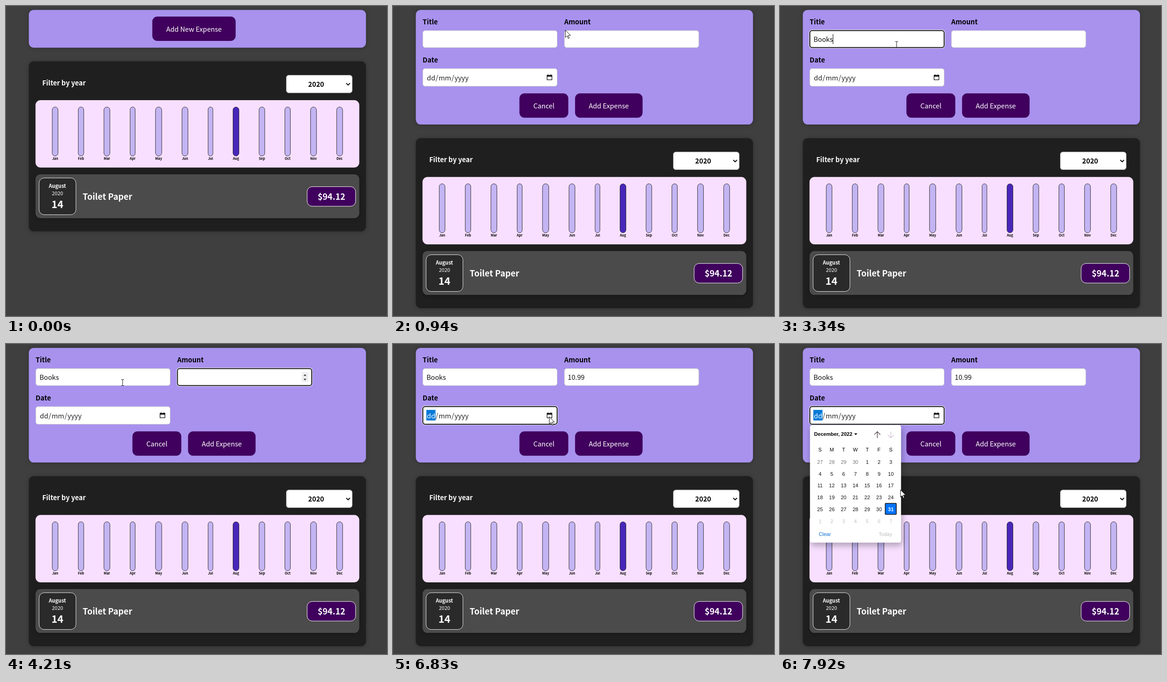
An HTML page that plays this animation: 830 by 675 pixels, repeating every 7990 ms.

```html
<!DOCTYPE html>
<html lang="en">
<head>
<meta charset="utf-8">
<title>Expense tracker</title>
<style>
  html, body { margin: 0; width: 100%; height: 100%; overflow: hidden; background: #3f3f3f; }
  svg { display: block; width: 830px; height: 675px; }
  text { font-family: "Noto Sans CJK JP", "Noto Sans CJK SC", "Noto Sans CJK", "Noto Sans", sans-serif; font-size: 14.69px; white-space: pre; }
  .b { font-weight: 700; }
  .cal text { font-family: "Liberation Sans", Arial, sans-serif; font-size: 11.02px; }
  .panel { filter: drop-shadow(0 1px 4px rgba(0,0,0,.25)); }
  .pop { filter: drop-shadow(2px 6px 7px rgba(0,0,0,.3)); }
</style>
</head>
<body>
<svg id="stage" viewBox="0 0 830 675"></svg>
<script>
const LOOP = 7990, STEP = 68;
const OPEN = 940, TITLE = 1410, AMOUNT = 3680, DATE = 6760, POPUP = 6900;

const rect = (x, y, w, h, r, fill, more = '') =>
  `<rect x="${x}" y="${y}" width="${w}" height="${h}" rx="${r}" fill="${fill}" ${more}/>`;
const text = (x, y, str, more = '') => `<text x="${x}" y="${y}" ${more}>${str}</text>`;
const mid = 'text-anchor="middle"';
const bold = 'class="b"';
const white = 'fill="#fff"';
const group = (id, body, more = '') => `<g id="${id}" ${more}>${body}</g>`;
const path = (d, more) => `<path d="${d}" ${more}/>`;

// Buttons: id, x, y, width, label
const buttons = {
  add: [318.7, 23, 181.6, 'Add New Expense'],
  cancel: [275.4, 190.2, 106.5, 'Cancel'],
  submit: [396.6, 190.2, 147.1, 'Add Expense']
};
const BUTTON_H = 53;
const button = id => {
  const [x, y, w, label] = buttons[id];
  return rect(x, y, w, BUTTON_H, 11, '#40005d', `id="${id}"`) +
    text(x + w / 2, y + 33, label, `${mid} ${white}`);
};

// Fields: x, y, height
const fields = { title: [64.5, 53, 38], amount: [373, 53, 38], date: [64.5, 135.7, 39.5] };
const FIELD_W = 293.6;
const field = id => {
  const [x, y, h] = fields[id];
  return rect(x + .5, y + .5, FIELD_W - 1, h - 1, 5, '#fff', 'stroke="#ccc"');
};
const ring = id => {
  const [x, y, h] = fields[id];
  return group(id + 'Ring',
    rect(x - 1.4, y - 1.4, FIELD_W + 2.8, h + 2.8, 6.8, '#fff') +
    rect(x + .5, y + .5, FIELD_W - 1, h - 1, 5, '#fff', 'stroke="#101010" stroke-width="2"'));
};

function formMarkup() {
  const spinner = group('spinner',
    rect(644, 61, 15, 22, 0, '#f0f0f0') +
    path('M648 69.5h6.6l-3.3-4zM648 75.5h6.6l-3.3 4z', 'fill="#4a4a4a"'));
  const icon =
    path('M335.6 151.2h10.6v9.4h-10.6z', 'fill="none" stroke="#111" stroke-width="1.3"') +
    path('M335 150.6h11.8v3.2h-11.8zM337 149h1.4v2h-1.4zM343.4 149h1.4v2h-1.4z', 'fill="#111"');
  return text(64.6, 40, 'Title', bold) + text(373, 40, 'Amount', bold) +
    text(64.6, 123, 'Date', bold) +
    field('title') + field('amount') + field('date') +
    ring('title') + ring('amount') + ring('date') + spinner +
    text(72.9, 78, '', 'id="titleText" fill="#111"') +
    text(380.8, 78, '', 'id="amountText" fill="#111"') +
    rect(0, 61, 1, 22, 0, '#000', 'id="caret"') +
    rect(72.6, 143.5, 20, 23, 0, '#0078d7', 'id="pick"') +
    text(73.8, 161.5, 'dd', 'id="day"') +
    [[92.8, '/'], [99.5, 'mm'], [127.5, '/'], [134, 'yyyy']]
      .map(([x, s]) => text(x, 161.5, s, 'fill="#222"')).join('') +
    icon + button('cancel') + button('submit');
}

function chartMarkup() {
  const months = 'Jan Feb Mar Apr May Jun Jul Aug Sep Oct Nov Dec'.split(' ');
  const centers = [107, 163.4, 219.8, 275.9, 332.5, 389.9, 445.5, 501, 557.5, 613.5, 669.9, 726.8];
  const widths = [13.5, 13, 14, 12, 14.5, 14, 11.5, 14, 13.5, 13, 14, 14];
  return rect(64.3, 205, 705.3, 146.7, 11, '#f8dfff') + months.map((m, i) => {
    const w = widths[i] - 1;
    return rect(centers[i] - w / 2, 219.9, w, 106.7, w / 2, m === 'Aug' ? '#4826b9' : '#c3b4f3', 'stroke="#313131"') +
      text(centers[i], 335, m, `${bold} ${mid} style="font-size:7.34px"`);
  }).join('');
}

function listMarkup() {
  const size = px => `style="font-size:${px}px"`;
  return rect(49.7, 120.6, 734.5, 370.2, 11, '#1f1f1f', 'class="panel"') +
    text(79, 172.5, 'Filter by year', `${bold} ${white}`) +
    rect(610.5, 150.5, 143.8, 38.8, 5.5, '#fff', 'stroke="#858585"') +
    text(658.3, 176, '2020', bold) +
    path('M741.2 168l4.1 4.1 4.1-4.1', 'fill="none" stroke="#111" stroke-width="2"') +
    chartMarkup() +
    rect(64.3, 366.4, 705.3, 95.5, 11, '#4b4b4b', 'class="panel"') +
    rect(72.1, 374.4, 80.2, 80, 11, '#2a2a2a', 'stroke="#ececec"') +
    text(112, 396, 'August', `${bold} ${mid} ${white} ${size(11.02)}`) +
    text(112.2, 412, '2020', `${mid} ${white} ${size(11.02)}`) +
    text(112, 440, '14', `${bold} ${mid} ${white} ${size(22.03)}`) +
    text(167, 422.3, 'Toilet Paper', `${bold} ${white} ${size(18.36)}`) +
    rect(656, 393.4, 105.6, 42.6, 11, '#40005d', 'stroke="#fff"') +
    text(709, 422.3, '$94.12', `${bold} ${mid} ${white} ${size(18.36)}`);
}

function calendarMarkup() {
  const colX = c => 87.2 + c * 25.7;
  let out = rect(65.3, 176.7, 198.4, 255.8, 4.5, '#fff', 'class="pop"') +
    text(74.3, 200, 'December, 2022', bold) +
    path('M161.5 194.5h7l-3.5 4z', 'fill="#111"') +
    path('M212 205v-14M205.5 197.3l6.5-6.5 6.5 6.5', 'fill="none" stroke="#3a2a36" stroke-width="1.2"') +
    path('M241.5 190.5v14M235 198l6.5 6.5 6.5-6.5', 'fill="none" stroke="#cdbdd0" stroke-width="1.2"') +
    rect(229.3, 347, 24, 24, 1, '#0075ff', 'stroke="#101010" stroke-width="1.6"');
  [...'SMTWTFS'].forEach((d, c) => out += text(colX(c), 234, d, mid));
  for (let i = 0; i < 42; i++) {
    const n = i - 3;
    const day = n < 1 ? n + 30 : n > 31 ? n - 31 : n;
    const fill = n < 1 ? '#757575' : n > 31 ? '#c3bec6' : n === 31 ? '#fff' : '#101010';
    out += text(colX(i % 7), 261 + Math.floor(i / 7) * 25.7, day,
      `${mid} fill="${fill}" ${n === 31 ? bold : ''}`);
  }
  return out + text(84.6, 418, 'Clear', 'fill="#0a6ed1"') + text(215, 418, 'Today', 'fill="#bdbdbd"');
}

const ink = 'fill="#fff" stroke="#111" stroke-linejoin="round"';
const cursors =
  group('arrow', path('M.5.5v16l3.7-3.6 2.5 5.8 2.4-1-2.5-5.7h5.1z', ink)) +
  group('hand', path('M-1 1.2c0-2 3.2-2 3.2 0v5.6c.6-1 2.6-.9 2.9.5.8-.9 2.4-.6 2.7.7.9-.6 2.4 0 2.4 1.6v4.2c0 2-1.4 3-1.4 5.7H.8c0-2-3.4-5.4-4.6-8-.7-1.6 1.4-2.3 2.8-.4z', ink.replace('#111', '#333')) +
    path('M2.2 7v4M5.1 7.5v3.8M7.8 8.2v3.4', 'stroke="#555" stroke-width=".8"')) +
  group('beam', path('M-3-6.5h2.5l.5.5.5-.5H3M0-6v12M-3 6.5h2.5l.5-.5.5.5H3', 'fill="none" stroke="#111"'));

document.getElementById('stage').innerHTML =
  rect(0, 0, 830, 675, 0, '#3f3f3f') +
  rect(49.7, 8.4, 734.5, 82.4, 11, '#a892ee', 'id="top" class="panel"') +
  group('closed', button('add')) +
  group('form', formMarkup()) +
  group('list', listMarkup()) +
  group('calendar', calendarMarkup(), 'class="cal"') +
  '<circle id="click" r="10.5" fill="#e8c000" fill-opacity=".62"/>' +
  group('cursor', cursors);

const el = id => document.getElementById(id);
const show = (id, on) => el(id).setAttribute('display', on ? 'inline' : 'none');

// Pointer moves: first and last step, end point, optional bend and easing
const easeInOut = p => p * p * (3 - 2 * p);
const easeOut = p => 1 - (1 - p) ** 2;
const moves = [
  { from: 260, to: 800, end: [375, 52], bend: [435, 262], ease: easeInOut },
  { from: 1010, to: 1270, end: [254, 84], ease: easeInOut },
  { from: 6090, to: 6360, end: [497, 365], ease: easeInOut },
  { from: 6430, to: 6695, end: [340, 158], ease: easeOut },
  { from: 7300, to: 7370, end: [317, 171], ease: p => p },
  { from: 7640, to: 7920, end: [262, 317], ease: easeInOut }
];

function pointer(t) {
  let at = [793, 657];
  for (const m of moves) {
    if (t < m.from) break;
    const done = (Math.floor((t - m.from) / STEP) + 1) * STEP;
    const p = m.ease(Math.min(1, done / (m.to - m.from + STEP - 6)));
    const bend = m.bend || at.map((v, i) => (v + m.end[i]) / 2);
    at = at.map((v, i) => (1 - p) ** 2 * v + 2 * p * (1 - p) * bend[i] + p * p * m.end[i]);
  }
  return at;
}

const typed = {
  title: { start: TITLE, word: 'Books', keys: [2740, 3000, 3140, 3270, 3340], carets: [72, 82, 91, 100, 108, 115] },
  amount: { start: AMOUNT, word: '10.99', keys: [4410, 4880, 5220, 5550, 5750], carets: [381, 388, 397, 401, 409, 417] }
};
const clicks = [[800, 940], [TITLE, 1480], [DATE, 6830]];

const inside = ([px, py], x, y, w, h) => px >= x && px < x + w && py >= y && py < y + h;

function draw(t) {
  const open = t >= OPEN;
  const focus = t >= DATE ? 'date' : t >= AMOUNT ? 'amount' : t >= TITLE ? 'title' : '';
  show('closed', !open);
  show('form', open);
  el('top').setAttribute('height', open ? 249.7 : 82.4);
  el('list').setAttribute('transform', `translate(0 ${open ? 167.2 : 0})`);

  for (const id in fields) show(id + 'Ring', focus === id);
  show('spinner', focus === 'amount');
  show('pick', focus === 'date');
  el('day').setAttribute('fill', focus === 'date' ? '#fff' : '#222');
  show('calendar', t >= POPUP);

  show('caret', false);
  for (const id in typed) {
    const { start, word, keys, carets } = typed[id];
    const n = keys.filter(k => t >= k).length;
    el(id + 'Text').textContent = word.slice(0, n);
    if (focus === id) {
      const since = t - (n ? keys[n - 1] : start);
      show('caret', Math.floor(since / 530) % 2 === 0);
      el('caret').setAttribute('x', carets[n]);
    }
  }

  const at = pointer(t);
  let kind = 'arrow';
  for (const id in buttons) {
    const [x, y, w] = buttons[id];
    const over = (id === 'add') !== open && inside(at, x, y, w, BUTTON_H);
    el(id).setAttribute('fill', over ? '#510674' : '#40005d');
    if (over) kind = 'hand';
  }
  for (const id of ['title', 'amount']) {
    const [x, y, h] = fields[id];
    if (open && inside(at, x, y, FIELD_W, h)) kind = 'beam';
  }
  for (const id of ['arrow', 'hand', 'beam']) show(id, id === kind);
  show('cursor', t >= 260);
  el('cursor').setAttribute('transform', `translate(${at.map(Math.round)})`);
  show('click', clicks.some(([a, b]) => t >= a && t < b));
  el('click').setAttribute('transform', `translate(${at[0]} ${at[1] - 1})`);
}

const begin = performance.now();
function tick() {
  draw((performance.now() - begin) % LOOP);
  requestAnimationFrame(tick);
}
tick();
</script>
</body>
</html>
```
